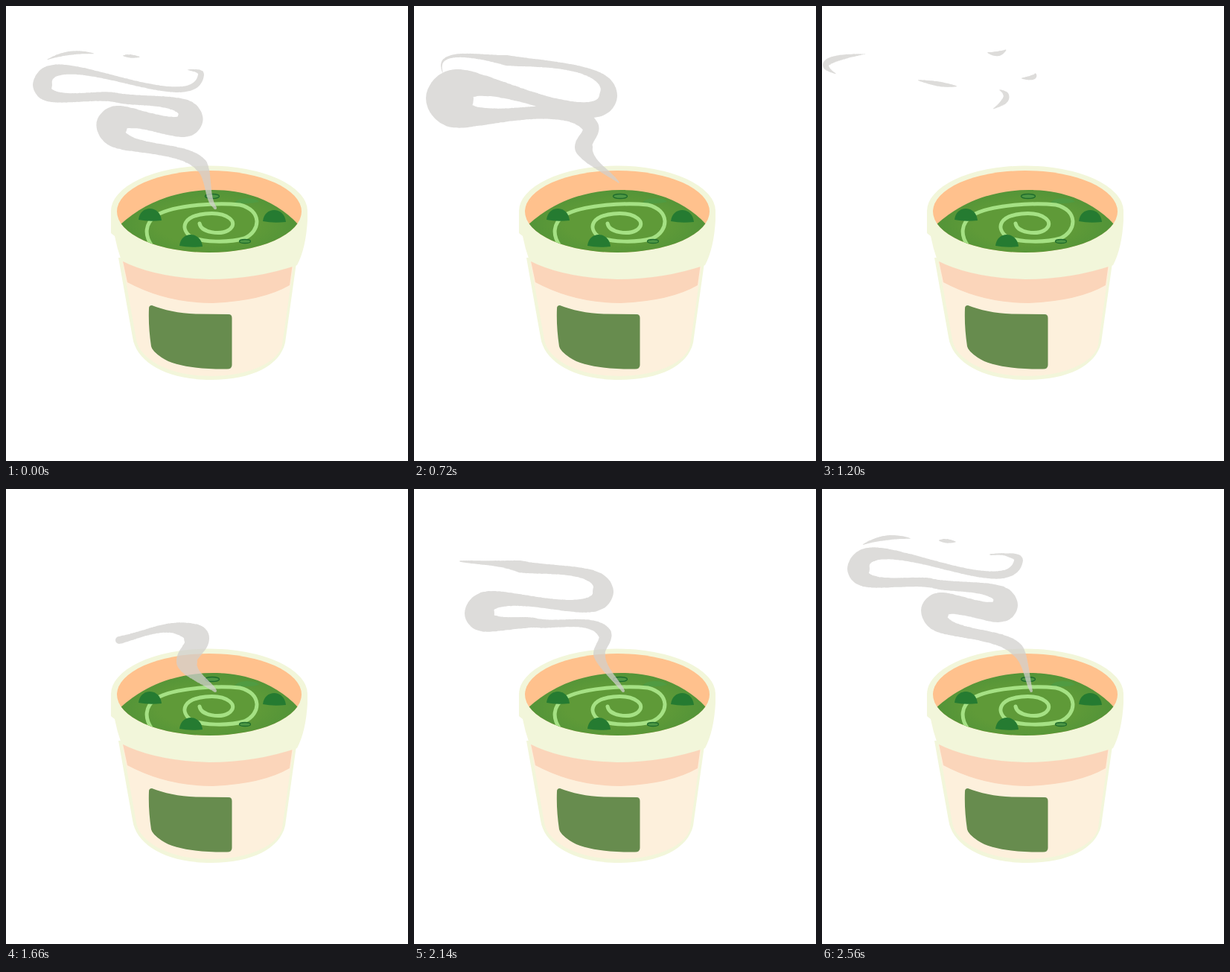
Write an HTML page that moves like this. It is 540 px wide and 611 px high and loops after 2.62 s.

```html
<!DOCTYPE html>
<html lang="en">
<head>
<meta charset="utf-8">
<title>Hot soup</title>
<style>
html, body { margin: 0; width: 100%; height: 100%; overflow: hidden; background: #fff; }
svg { display: block; width: 540px; height: 611px; }
</style>
</head>
<body>
<svg viewBox="0 0 540 611">
  <defs>
    <clipPath id="bowl"><ellipse cx="273" cy="276" rx="124" ry="55"/></clipPath>
    <radialGradient id="broth" gradientUnits="userSpaceOnUse" cx="0" cy="0" r="1" gradientTransform="translate(272 293) scale(124 50)">
      <stop offset=".55" stop-color="#5f9a38"/>
      <stop offset="1" stop-color="#519338"/>
    </radialGradient>
  </defs>

  <!-- cup -->
  <path fill="#f2f6da" d="M151 338L170 445C175 478 215 502 276 502C330 502 368 483 375 452L390 345Z"/>
  <path fill="#fdf0dc" d="M156 341L175 448C179 472 215 497 276 497C328 497 367 477 371 455L386 350Z"/>
  <path fill="#fbd5ba" d="M156 338L163 371Q215 399 278 399Q345 396 381 375L385 346Z"/>
  <path fill="#678c4e" d="M196 402C212 408 232 413 255 413.500L299 414Q303.500 414 303.500 419V482Q303.500 487.500 297 487.500C262 488 226 484 209 472Q196 463 195 457Q191 430 192 406Q192 402 196 402Z"/>
  <path fill="#f2f6da" d="M141 305L141 276A132 61 0 0 1 405 275V287Q403 325 391 348Q335 367 273 367Q200 365 155 342Q149 325 146 309Z"/>

  <!-- soup -->
  <g clip-path="url(#bowl)">
    <path fill="#ffc18d" d="M140 210H410V340H140Z"/>
    <path fill="url(#broth)" d="M153 294C190 260 235 247 278 247C325 247 365 263 393 294V340H153Z"/>
    <path fill="#509b42" d="M307 264Q312 258 323 258Q336 258 340 263Q323 267 307 264Z"/>
    <path fill="none" stroke="#a5e184" stroke-width="5" stroke-linecap="round" d="M196 322C186 308 186 292 202 281C228 266 288 264 314 267C344 274 343 302 320 312C300 318 262 318 247 309C234 298 238 282 268 279C298 276 314 291 299 301C287 308 262 304 260 292"/>
    <g id="leaves" fill="#257b31"></g>
    <g fill="#4d9744" stroke="#1f6c2c" stroke-width="1.300">
      <ellipse cx="277" cy="255.500" rx="9.500" ry="3"/>
      <ellipse cx="321" cy="316" rx="7.500" ry="2.500"/>
    </g>
  </g>

  <path id="steam" fill="#d1d0ce" opacity=".74"/>
</svg>
<script>
const LOOP = 2620, STEP = 60, CLEAR = 1260, RISE = 1360;
const KEYS = [1660, 2140, 2560, 2980, 3340];
const BIRTH = 1300, FADE = KEYS[4], GONE = 3820, WISP_LIFE = 300;
const SOURCE = [281, 271, 2];

const steam = document.getElementById("steam");
const mix = (a, b, u) => a + (b - a) * u;
const mixAll = (a, b, u) => a.map((v, i) => mix(v, b[i], u));

document.getElementById("leaves").innerHTML = [[178, 288], [345, 290], [233, 323]]
  .map(([x, y]) => `<path d="M${x} ${y - 1}C${x + 2} ${y - 21} ${x + 29} ${y - 21} ${x + 31} ${y}Q${x + 14} ${y + 2} ${x} ${y - 1}Z"/>`)
  .join("");

// Bends of the plume from the soup upwards. Each leaves the soup before
// KEYS[first], then passes [x, y, radius] at that and the following keys.
const bend = (first, ...path) => ({ first, path });
const plume = [
  bend(3, [281, 272, 2.5], [275, 237, .8]),
  bend(3, [249, 222, 8.5], [228, 190, 12]),
  bend(2, [262, 216, 9], [257, 195, 9], [237, 162, 11]),
  bend(1, [249, 222, 8], [152, 163, 19], [84, 141, 32], [48, 124, 32]),
  bend(1, [256, 194, 9], [246, 156, 17], [256, 128, 18], [261, 121, 12]),
  bend(1, [165, 180, 6], [150, 127, 6], [140, 100, 8], [124, 73, 7]),
  bend(0, [243, 232, 14], [88, 167, 20], [49, 107, 15], [49, 98, .8], [37, 82, .8]),
  bend(0, [256, 200, 17], [254, 138, 14], [264, 96, 6], [250, 70, -8]),
  bend(0, [228, 187, 7], [142, 104, 8], [246, 88, 1.5], [225, 70, -8]),
  bend(0, [152, 203, 5], [62, 97, .8], [226, 88, .8], [215, 70, -8])
];

// Loose scraps: moment of full size, radius, and a three-point curve.
const wisps = [
  [2560, 3, [52, 76], [85, 60], [122, 67]],
  [2560, 2.5, [156, 69], [167, 70], [181, 71]],
  [2980, 2.5, [161, 77], [185, 66], [222, 84]],
  [GONE, 4.5, [21, 92], [-25, 72], [63, 64]],
  [GONE, 3, [126, 99], [160, 106], [183, 108]],
  [GONE, 4, [228, 139], [262, 122], [237, 112]],
  [GONE, 3, [266, 97], [290, 98], [286, 90]],
  [GONE, 3, [221, 62], [238, 68], [248, 58]]
];

function place({ first, path }, t) {
  const at = k => k < first ? SOURCE : path[Math.min(k - first, path.length - 1)];
  let k = KEYS.findIndex(key => key > t);
  if (k < 0) return at(KEYS.length - 1);
  const from = k ? KEYS[k - 1] : BIRTH;
  return mixAll(at(k - 1), at(k), (t - from) / (KEYS[k] - from));
}

function unit(x, y) {
  const d = Math.hypot(x, y) || 1;
  return [x / d, y / d];
}

function disc(x, y, r) {
  if (r < .4) return "";
  const f = n => n.toFixed(2);
  return `M${f(x - r)} ${f(y)}a${f(r)} ${f(r)} 0 1 1 ${f(2 * r)} 0a${f(r)} ${f(r)} 0 1 1 ${f(-2 * r)} 0`;
}

// Sweeps a disc along the bends; long stretches thin out in the middle,
// and a growing ripple breaks the plume up at the end of its life.
function drawPlume(t) {
  const pts = plume.map(b => place(b, t));
  const n = pts.length - 1;
  const dir = pts.slice(1).map((q, i) => unit(q[0] - pts[i][0], q[1] - pts[i][1]));
  const tan = pts.map((p, i) => {
    const a = dir[Math.max(0, i - 1)], b = dir[Math.min(n - 1, i)];
    return unit(a[0] + b[0], a[1] + b[1]);
  });
  const fade = Math.max(0, (t - FADE) / (GONE - FADE));
  let d = "";
  for (let i = 0; i < n; i++) {
    const p = pts[i], q = pts[i + 1];
    const len = Math.hypot(q[0] - p[0], q[1] - p[1]);
    const pinch = .6 * Math.min(1, len / 160), steps = Math.ceil(len * 1.3) + 1;
    for (let j = 0; j <= steps; j++) {
      const s = j / steps, pull = .9 * len * s * (1 - s);
      const [x, y] = [0, 1].map(c =>
        mix(p[c], q[c], s * s * (3 - 2 * s)) + pull * ((1 - s) * tan[i][c] - s * tan[i + 1][c]));
      const r = mix(p[2], q[2], s) * (1 - pinch * Math.sin(Math.PI * s));
      d += disc(x, y - 25 * fade, r * (1 - fade) - 5 * fade * (1 + Math.sin(x / 14)));
    }
  }
  return d;
}

function drawWisp([peak, radius, a, b, c], t) {
  const size = radius * (1 - Math.abs(t - peak) / WISP_LIFE);
  if (size <= 0) return "";
  let d = "";
  for (let s = 0; s <= 1; s += .01) {
    const [x, y] = mixAll(mixAll(a, b, s), mixAll(b, c, s), s);
    d += disc(x, y - (t - peak) * .04, size * Math.sin(Math.PI * s));
  }
  return d;
}

function draw(t) {
  if (t >= CLEAR && t < RISE) return "";
  const from = t < CLEAR ? 0 : RISE;
  const held = from + Math.floor((t - from) / STEP) * STEP;
  // A plume outlives the loop, so its early part belongs to the previous round.
  const age = held < RISE ? held + LOOP : held;
  return drawPlume(age) + wisps.map(w => drawWisp(w, age)).join("");
}

const start = performance.now();
function tick(now) {
  steam.setAttribute("d", draw(Math.max(0, now - start) % LOOP));
  requestAnimationFrame(tick);
}
tick(start);
</script>
</body>
</html>
```
